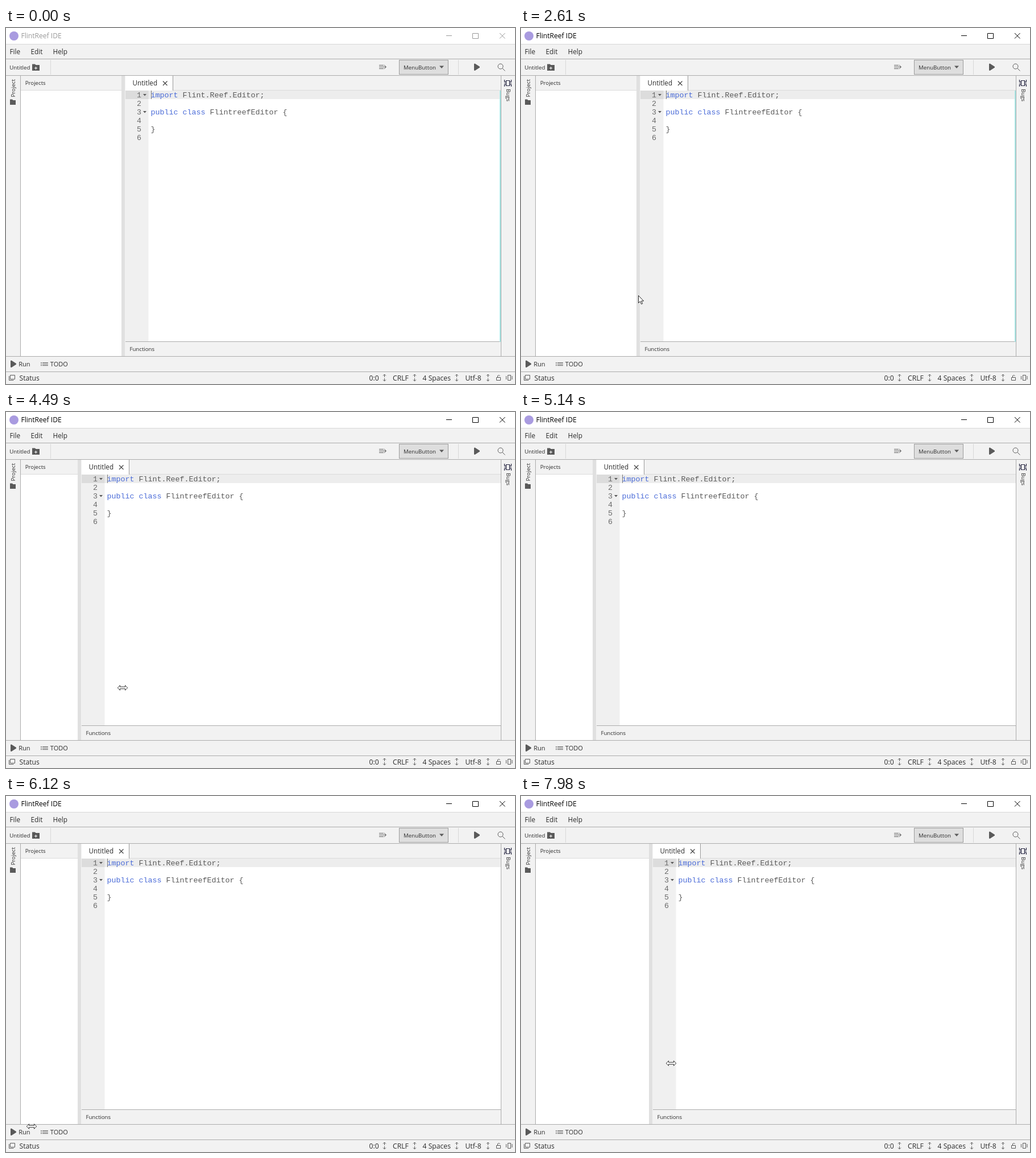
Animation, 895 px wide and 626 px high, one loop 8 s. Source, as an HTML page:

```html
<!DOCTYPE html>
<html lang="en">
<head>
<meta charset="utf-8">
<title>Code editor</title>
<style>
  html, body { margin: 0; width: 100%; height: 100%; overflow: hidden; background: #fff; }
  svg { display: block; width: 895px; height: 626px; }
  text { font: 9.7px "Open Sans", "Noto Sans", sans-serif; fill: #2c2c2c; }
  .menu text { font-size: 11.8px; }
  .run text { font-size: 11px; }
  .status text { font-size: 12.2px; }
  text.tab { font-size: 11.7px; }
  .code text { font: 13.333px "Liberation Mono", monospace; fill: #5a5a5a; white-space: pre; }
  .code .nums { fill: #6a6a6a; text-anchor: end; }
  .key { fill: #4a6bd8; }
  .bar { fill: #f2f2f2; }
  .rule { stroke: #acacac; fill: none; }
  .icon { fill: #5a5a5a; }
  .line { stroke: #5a5a5a; fill: none; }
  #caption text { font-size: 12.1px; fill: #000; }
  #caption path { stroke: #000; fill: none; }
  #caption.idle text { fill: #999; }
  #caption.idle path { stroke: #999; }
</style>
</head>
<body>
<svg viewBox="0 0 895 626">
  <defs>
    <path id="sort" class="line" d="M-2.5 -3.5L0 -6L2.5 -3.5M0 -6V-1M-2.5 3.5L0 6L2.5 3.5M0 6V1"/>
    <path id="play" class="icon" d="M0 .5L1.5 0L10 5.5V7L1.5 12.5L0 12Z"/>
  </defs>
  <rect width="895" height="626" fill="#fff"/>

  <!-- title bar -->
  <circle cx="14" cy="14" r="8" fill="#a99be0"/>
  <g id="caption">
    <text x="26.5" y="18">FlintReef IDE</text>
    <path d="M774 13.5H784M820.5 9.5H830.5V18.5H820.5ZM868 9L877.5 18.5M877.5 9L868 18.5"/>
  </g>

  <!-- menu and tool bars -->
  <rect class="bar" y="28" width="895" height="56"/>
  <path class="rule" d="M0 54.5H895M0 83.5H895"/>
  <path d="M0 28.5H895M78.5 56V82M795.5 56V82" stroke="#d8d8d8"/>
  <g class="menu">
    <text x="6.5" y="45.5">File</text>
    <text x="43.5" y="45.5">Edit</text>
    <text x="82.5" y="45.5">Help</text>
  </g>
  <text x="6.3" y="72.5">Untitled</text>
  <path class="icon" d="M46 63.5H51L52.5 65H59V75H46Z"/>
  <path d="M50 70.5H55M52.5 68V73" stroke="#fff"/>
  <path class="line" d="M656 65.5H664M656 68.5H668M656 71.5H664M665 65L668.5 68.5L665 72"/>
  <rect x="691.5" y="56.5" width="86" height="25" fill="#dedede" stroke="#9c9c9c"/>
  <text x="699" y="72.5">MenuButton</text>
  <path class="icon" d="M762 66.5H770L766 71Z"/>
  <use href="#play" x="823" y="62.5"/>
  <circle class="line" cx="869.5" cy="67.5" r="4.5"/>
  <path class="line" d="M873 71L877.5 75.5"/>

  <!-- project panel -->
  <rect class="bar" y="84" width="25" height="494"/>
  <rect class="bar" x="26" y="84" width="869" height="25"/>
  <path d="M26 109.5H870" stroke="#dcdcdc"/>
  <path class="rule" d="M25.5 84V578"/>
  <text transform="translate(15.5 121.5) rotate(-90)">Project</text>
  <path class="icon" d="M7 125.5H11L12.5 127H17V135H7Z"/>
  <text x="33.7" y="99.8">Projects</text>

  <!-- editor, origin at its left edge -->
  <g id="editor">
    <rect class="bar" x="-1" y="84" width="900" height="494"/>
    <rect x="-7" y="84" width="6" height="494" fill="#e0e0e0"/>
    <path d="M0 109.5H900" stroke="#dcdcdc"/>
    <rect y="84" width="83" height="26" fill="#fff"/>
    <path d="M83.5 84V110" stroke="#999"/>
    <text class="tab" x="12.5" y="101.2">Untitled</text>
    <path d="M66 93.5L73.5 101M73.5 93.5L66 101" stroke="#444" stroke-width="1.2"/>
    <rect y="110" width="900" height="442" fill="#fff"/>
    <rect y="110" width="40.5" height="442" fill="#f0f0f0"/>
    <rect y="110" width="900" height="15" fill="#ededed"/>
    <rect y="110" width="40.5" height="15" fill="#dcdcdc"/>
    <path class="icon" d="M31 116H37L34 119.5ZM31 146H37L34 149.5Z"/>
    <path d="M45.5 110V125" stroke="#777"/>
    <g class="code">
      <text class="nums" id="nums"></text>
      <text x="44.5" y="121.5"><tspan class="key">import</tspan> Flint.Reef.Editor;</text>
      <text x="44.5" y="151.5"><tspan class="key">public class</tspan> FlintreefEditor {</text>
      <text x="44.5" y="181.5">}</text>
    </g>
    <rect class="bar" y="552" width="900" height="26"/>
    <path class="rule" d="M0 551.5H900"/>
    <text x="7.4" y="567.8">Functions</text>
  </g>
  <rect id="edge" y="110" height="442"/>

  <!-- right strip -->
  <rect class="bar" x="870" y="84" width="25" height="494"/>
  <path class="rule" d="M870.5 84V578"/>
  <path d="M879.5 92.5H885.5V101.5H879.5ZM876.5 91V94.5H879M876.5 103V99.5H879M888.5 91V94.5H886M888.5 103V99.5H886M876 97H879M886 97H889" fill="none" stroke="#2a2a45" stroke-width="1.2"/>
  <text transform="translate(879.5 107) rotate(90)">Bugs</text>

  <!-- run and status bars -->
  <rect class="bar" y="578" width="895" height="48"/>
  <path class="rule" d="M0 577.5H895M0 604.5H895"/>
  <g class="run">
    <use href="#play" x="8" y="584.5"/>
    <text x="22.3" y="595">Run</text>
    <path class="line" d="M61 588.5H63M64 588.5H74M61 591H63M64 591H74M61 593.5H63M64 593.5H74"/>
    <text x="77.8" y="595">TODO</text>
  </g>
  <g class="status">
    <path class="line" d="M7.5 610.5H15.5V617.5H7.5ZM5.5 612V619.5H13.5"/>
    <text x="23.5" y="620">Status</text>
    <text x="638.5" y="620">0:0</text>
    <text x="680" y="620">CRLF</text>
    <text x="732.5" y="620">4 Spaces</text>
    <text x="807.5" y="620">Utf-8</text>
    <use href="#sort" x="665.5" y="615"/>
    <use href="#sort" x="718.5" y="615"/>
    <use href="#sort" x="792.5" y="615"/>
    <use href="#sort" x="847.5" y="615"/>
    <path class="line" d="M862.5 614.5H869.5V619.5H862.5ZM864.5 614V611.5Q866.5 609.5 868.5 611.5"/>
    <path class="line" d="M882.5 610.5H887.5V619.5H882.5ZM879.5 612V618M890 612V618"/>
  </g>

  <!-- pointers -->
  <path id="arrow" d="M.5 .5V13.5L3.5 10.7L5.6 15.5L7.7 14.6L5.6 10H9.7Z" fill="#fff" stroke="#111" stroke-width=".9"/>
  <path id="resize" d="M-8.7 0L-4.5 -4.3V-1.7H4.5V-4.3L8.7 0L4.5 4.3V1.7H-4.5V4.3Z" fill="#fff" stroke="#333"/>
</svg>
<script>
const LOOP = 8000, STEP = 77.6, PHASE = 64; // the screen redraws once per STEP
const APPEAR = 60, HOVER = 1200, FOCUS = 1585, GRAB = 2900, DRAG = 3310;
const START_LEFT = 210, MIN_LEFT = 133, GRIP = 3.5;

const el = id => document.getElementById(id);
const editor = el('editor'), edge = el('edge'), caption = el('caption');
const arrow = el('arrow'), resize = el('resize');

el('nums').innerHTML = [1, 2, 3, 4, 5, 6]
  .map(n => `<tspan x="28" y="${106.5 + n * 15}">${n}</tspan>`).join('');

// turning points of the hand: time, place
const sweepX = [
  [60, 235], [130, 187], [420, 187], [800, 250], [1140, 210],
  [2370, 206], [2800, 206], [GRAB, 209], [3235, 209],
  [3645, 405], [4230, 12], [4720, 370], [5140, -60], [5290, -60],
  [5640, 340], [6120, 45], [6500, 324], [6890, 324],
  [7360, 89], [7620, 340], [7900, 228.5], [7980, 264]
];
const sweepY = [
  [60, 594], [130, 581], [420, 581], [HOVER, 516], [2370, 496],
  [2450, 470], [2830, 470], [GRAB, 479], [4200, 479],
  [6120, 581], [6360, 617], [6500, 600], [7128, 600], [7980, 470]
];

// cosine easing from one turning point to the next
function at(keys, t) {
  const i = keys.findIndex(k => k[0] >= t);
  if (i < 1) return keys.at(i)[1];
  const [ta, a] = keys[i - 1], [tb, b] = keys[i];
  return a + (b - a) * (1 - Math.cos(Math.PI * (t - ta) / (tb - ta))) / 2;
}

// the divider trails the hand by one redraw
function leftAt(t) {
  if (t < DRAG) return START_LEFT;
  return Math.max(MIN_LEFT, Math.round(at(sweepX, t - STEP) + GRIP));
}

function draw(time) {
  const t = PHASE + Math.floor((time - PHASE) / STEP) * STEP;
  const x = at(sweepX, t), y = at(sweepY, t), left = leftAt(t);
  const sizing = t >= GRAB || (t >= HOVER && t < FOCUS);

  editor.setAttribute('transform', `translate(${left} 0)`);
  caption.setAttribute('class', t < FOCUS ? 'idle' : '');
  arrow.style.display = t >= APPEAR && !sizing ? '' : 'none';
  resize.style.display = sizing ? '' : 'none';
  (sizing ? resize : arrow).setAttribute('transform',
    `translate(${Math.round(x)} ${Math.round(y)})`);

  // strip left bare while the page catches up with its new width
  const early = t < 4170;
  const growing = t > 6900 && x < at(sweepX, t - STEP) && left < leftAt(t - STEP);
  const bare = early ? 2 : growing ? 4 : 0;
  edge.setAttribute('x', 870 - bare);
  edge.setAttribute('width', bare);
  edge.setAttribute('fill', early ? '#a5e6e4' : '#40e8dc');
}

const begin = performance.now();
function loop() {
  draw((performance.now() - begin) % LOOP);
  requestAnimationFrame(loop);
}
loop();
</script>
</body>
</html>
```
